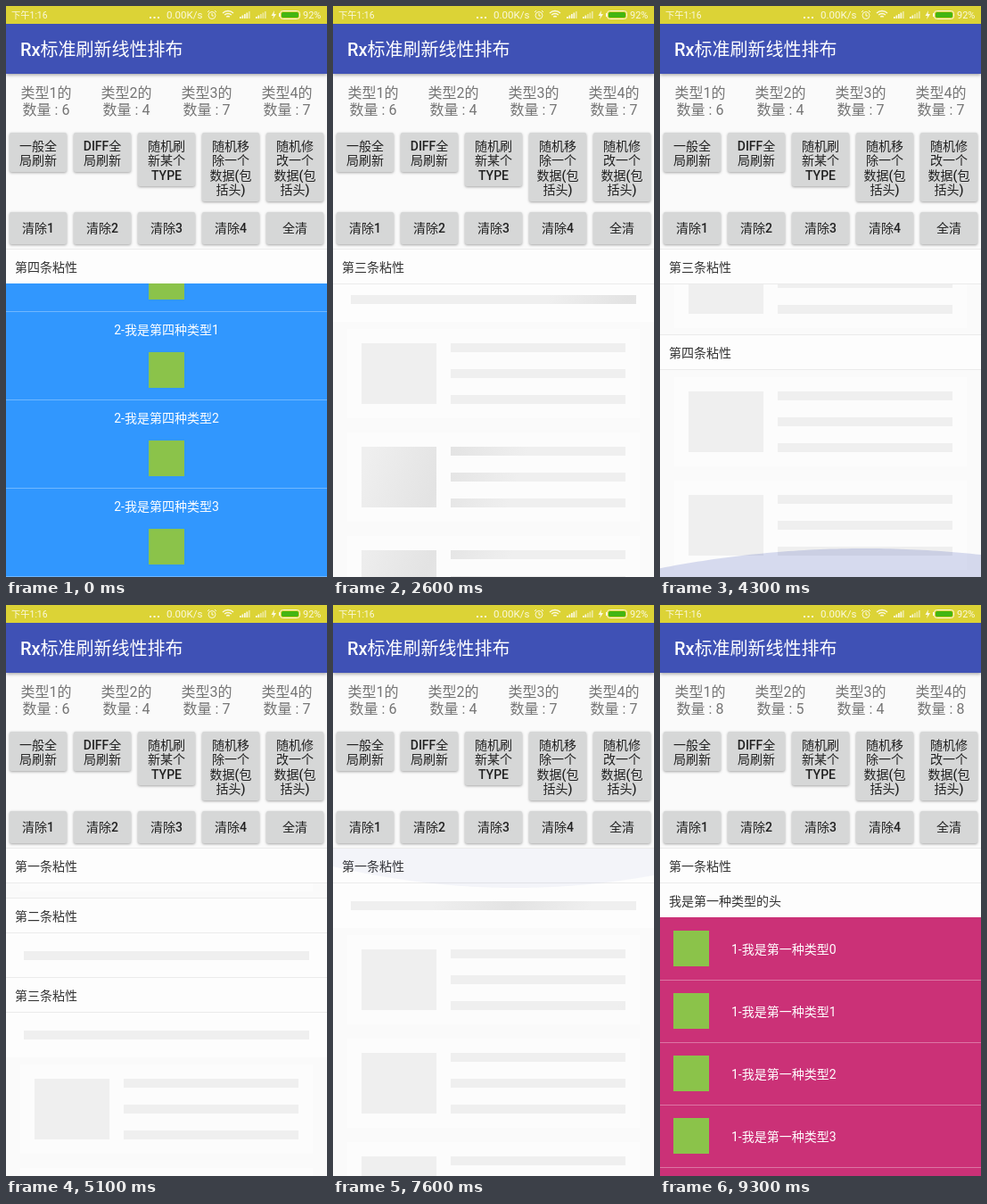
These frames come from a looping animation (360x640 px, 9.4 s). An HTML page with a canvas:

```html
<!DOCTYPE html>
<html lang="zh-CN">
<head>
<meta charset="utf-8">
<style>
  html, body { margin: 0; width: 100%; height: 100%; overflow: hidden; background: #fafafa; }
  canvas { display: block; width: 360px; height: 640px; }
</style>
</head>
<body>
<canvas id="stage" width="360" height="640"></canvas>
<script>
const ctx = document.getElementById('stage').getContext('2d');
const LOOP = 9400, LOAD_START = 300, LOAD_END = 8800;
const TOP = 273, HEAD = 39, BAR = 50, CARD = 116;
const SHIMMER = 3400 / 3;
const FAMILY = 'Roboto, "Noto Sans CJK SC", "Noto Sans CJK", sans-serif';

// Each section: optional title bar and cards, given by their shimmer phases.
const sections = [
  { name: '一', bar: 0.812, cards: [0.03, 0.03, 0.03] },
  { name: '二', bar: 0.6, cards: [] },
  { name: '三', bar: 0.352, cards: [0.75, 0.147, 0.13] },
  { name: '四', cards: [0, 0] }
];
let nextTop = 0;
for (const s of sections) {
  s.top = nextTop;
  nextTop += HEAD + (s.bar === undefined ? 0 : BAR) + s.cards.length * CARD;
}

const scrollKeys = [[1500, 0], [2400, 534], [2900, 534], [3300, 867],
  [4450, 867], [5150, 381], [6150, 381], [6900, 0]];

const clamp = v => Math.max(0, Math.min(1, v));
const ramp = (t, a, b) => clamp((t - a) / (b - a));

function scrollAt(t) {
  let pos = 0;
  for (let i = 1; i < scrollKeys.length; i++) {
    const [t0, s0] = scrollKeys[i - 1], [t1, s1] = scrollKeys[i];
    if (t >= t0) pos = s0 + (s1 - s0) * (1 - (1 - ramp(t, t0, t1)) ** 3);
  }
  return Math.round(pos);
}

function rect(x, y, w, h, color) {
  ctx.fillStyle = color;
  ctx.fillRect(x, y, w, h);
}

function text(str, x, y, size, color, align = 'left', weight = 400) {
  ctx.font = `${weight} ${size}px ${FAMILY}`;
  ctx.textAlign = align;
  ctx.fillStyle = color;
  ctx.fillText(str, x, Math.round(y));
}

function shape(points, color) {
  ctx.beginPath();
  points.forEach(([x, y]) => ctx.lineTo(x, y));
  ctx.closePath();
  ctx.fillStyle = color;
  ctx.fill();
}

function withShadow(blur, dy, alpha, draw) {
  ctx.save();
  ctx.shadowColor = `rgba(0,0,0,${alpha})`;
  ctx.shadowBlur = blur;
  ctx.shadowOffsetY = dy;
  draw();
  ctx.restore();
}

function statusBar() {
  const ink = '#fbf9e0';
  rect(0, 0, 360, 20, '#dcd336');
  text('下午1:16', 6, 14, 10.3, ink);
  for (let i = 0; i < 3; i++) rect(161 + i * 4.5, 12, 2, 2, ink);
  text('0.00K/s', 180, 14, 11.5, ink);

  ctx.strokeStyle = ink;
  ctx.lineWidth = 1;
  ctx.beginPath();
  ctx.arc(231, 10.5, 4, 0, 7);
  ctx.moveTo(231, 8); ctx.lineTo(231, 11); ctx.lineTo(233, 11);
  ctx.moveTo(226, 7); ctx.lineTo(228, 5);
  ctx.moveTo(236, 7); ctx.lineTo(234, 5);
  ctx.stroke();

  ctx.lineWidth = 1.4;
  for (const r of [2.5, 5.5, 8.5]) {
    ctx.beginPath();
    ctx.arc(249, 14, r, -Math.PI * 0.75, -Math.PI * 0.25);
    ctx.stroke();
  }
  [[262, 4], [280, 2]].forEach(([x, full]) => {
    for (let i = 0; i < 5; i++) {
      const h = 2 + i * 1.5;
      rect(x + i * 2.5, 14 - h, 1.7, h, i < full ? ink : 'rgba(255,255,255,.5)');
    }
  });
  shape([[301, 5], [297.5, 11], [300, 11], [299, 15], [303, 9], [300.5, 9]], ink);

  ctx.lineWidth = 1;
  ctx.beginPath();
  ctx.roundRect(307.5, 5.5, 22, 9, 3);
  ctx.stroke();
  rect(306, 8, 1.5, 4, ink);
  ctx.beginPath();
  ctx.roundRect(309, 7, 19, 6, 1.5);
  ctx.fillStyle = '#43b512';
  ctx.fill();
  text('92%', 333, 14, 11, ink);
}

function button(col, y, h, lines) {
  const x = 4 + col * 72;
  withShadow(3, 1, 0.35, () => {
    ctx.beginPath();
    ctx.roundRect(x, y, 64, h, 2);
    ctx.fillStyle = '#d6d7d7';
    ctx.fill();
  });
  lines.forEach((line, i) =>
    text(line, x + 32, y + (h < 40 ? 23 : 20) + i * 16.4, 14, '#212121', 'center', 500));
}

function controls(counts) {
  withShadow(4, 1, 0.4, () => rect(0, 20, 360, 56, '#3f51b5'));
  statusBar();
  text('Rx标准刷新线性排布', 16, 56, 20, '#fff', 'left', 500);
  counts.forEach((n, i) => {
    const x = 45 + i * 90;
    text(`类型${i + 1}的`, x, 103, 16, '#757575', 'center');
    text(`数量 : ${n}`, x, 122, 16, '#757575', 'center');
  });
  button(0, 142, 44, ['一般全', '局刷新']);
  button(1, 142, 44, ['DIFF全', '局刷新']);
  button(2, 142, 60, ['随机刷', '新某个', 'TYPE']);
  button(3, 142, 77, ['随机移', '除一个', '数据(包', '括头)']);
  button(4, 142, 77, ['随机修', '改一个', '数据(包', '括头)']);
  ['清除1', '清除2', '清除3', '清除4', '全清'].forEach((s, i) => button(i, 231, 36, [s]));
  rect(0, 272, 360, 1, '#e3e3e3');
}

function listHead(label, y, underline) {
  rect(0, y - 1, 360, HEAD, '#fdfdfd');
  rect(0, y - 1, 360, 1, '#ebebeb');
  if (underline) rect(0, y + HEAD - 1, 360, 1, '#ebebeb');
  text(label, 10, y + 25, 14, '#333');
}

const stickyHead = (name, y, underline = true) => listHead(`第${name}条粘性`, y, underline);

function shimmerFill(t, phase, y) {
  const x = -330 + 1020 * ((t / SHIMMER + phase) % 1);
  const g = ctx.createLinearGradient(x - 80, y, x + 80, y + 55);
  g.addColorStop(0, '#efefef');
  g.addColorStop(0.5, '#e3e3e3');
  g.addColorStop(1, '#efefef');
  return g;
}

function skeletonBar(t, phase, y) {
  rect(0, y, 360, BAR, '#fdfdfd');
  rect(20, y + 20, 320, 10, shimmerFill(t, phase, y));
}

function skeletonCard(t, phase, y) {
  rect(16, y + 8, 328, 100, '#fcfcfc');
  const fill = shimmerFill(t, phase, y + 24);
  rect(32, y + 24, 84, 68, fill);
  for (let i = 0; i < 3; i++) rect(132, y + 24 + i * 29, 196, 10, fill);
}

function glow(edge, dir, height, peak, alpha) {
  if (alpha <= 0 || height <= 0) return;
  ctx.beginPath();
  ctx.moveTo(0, edge);
  for (let x = 0; x <= 360; x += 6) {
    ctx.lineTo(x, edge + dir * height * (1 - 1.31e-5 * (x - peak) ** 2));
  }
  ctx.lineTo(360, edge);
  ctx.fillStyle = `rgba(63,81,181,${alpha})`;
  ctx.fill();
}

function skeletonList(t) {
  const scroll = scrollAt(t);
  for (const s of sections) {
    let y = TOP + s.top - scroll;
    stickyHead(s.name, y);
    y += HEAD;
    if (s.bar !== undefined) {
      skeletonBar(t, s.bar, y);
      y += BAR;
    }
    for (const phase of s.cards) {
      skeletonCard(t, phase, y);
      y += CARD;
    }
  }
  const current = sections.findLastIndex(s => s.top <= scroll);
  const next = sections[current + 1];
  const push = next ? Math.min(0, next.top - scroll - HEAD) : 0;
  stickyHead(sections[current].name, TOP + push);

  const bottom = ramp(t, 3250, 3600) * (1 - ramp(t, 4400, 4600));
  glow(640, -1, 32 * bottom, 230, 0.2 * bottom);
  const rise = ramp(t, 6850, 7000);
  glow(TOP, 1, 44 * rise, 204, 0.2 * rise * (1 - ramp(t, 7000, 7800)));
}

const badge = (x, y) => rect(x, y, 40, 40, '#8bc34a');

function blueList() {
  rect(0, TOP, 360, 367, '#3197fe');
  for (let i = 0; i < 5; i++) {
    const y = 244 + i * 99;
    rect(0, y - 1, 360, 1, '#70b7fe');
    text(`2-我是第四种类型${i}`, 180, y + 25, 14, '#fff', 'center');
    badge(160, y + 45);
  }
  stickyHead('四', TOP, false);
}

function pinkList() {
  rect(0, 350, 360, 290, '#cb3177');
  for (let i = 0; i < 5; i++) {
    const y = 351 + i * 70;
    badge(15, y + 14);
    text(`1-我是第一种类型${i}`, 80, y + 40, 14, '#fff');
    rect(0, y + 69, 360, 1, '#dc75a4');
  }
  listHead('我是第一种类型的头', TOP + HEAD, false);
  stickyHead('一', TOP);
}

function draw(t) {
  const loaded = t >= LOAD_END;
  rect(0, 0, 360, 640, '#fafafa');
  controls(loaded ? [8, 5, 4, 8] : [6, 4, 7, 7]);
  ctx.save();
  ctx.beginPath();
  ctx.rect(0, TOP - 1, 360, 368);
  ctx.clip();
  if (t < LOAD_START) blueList();
  else if (loaded) pinkList();
  else skeletonList(t);
  ctx.restore();
}

const start = performance.now();
function tick() {
  draw((performance.now() - start) % LOOP);
  requestAnimationFrame(tick);
}
tick();
</script>
</body>
</html>
```
